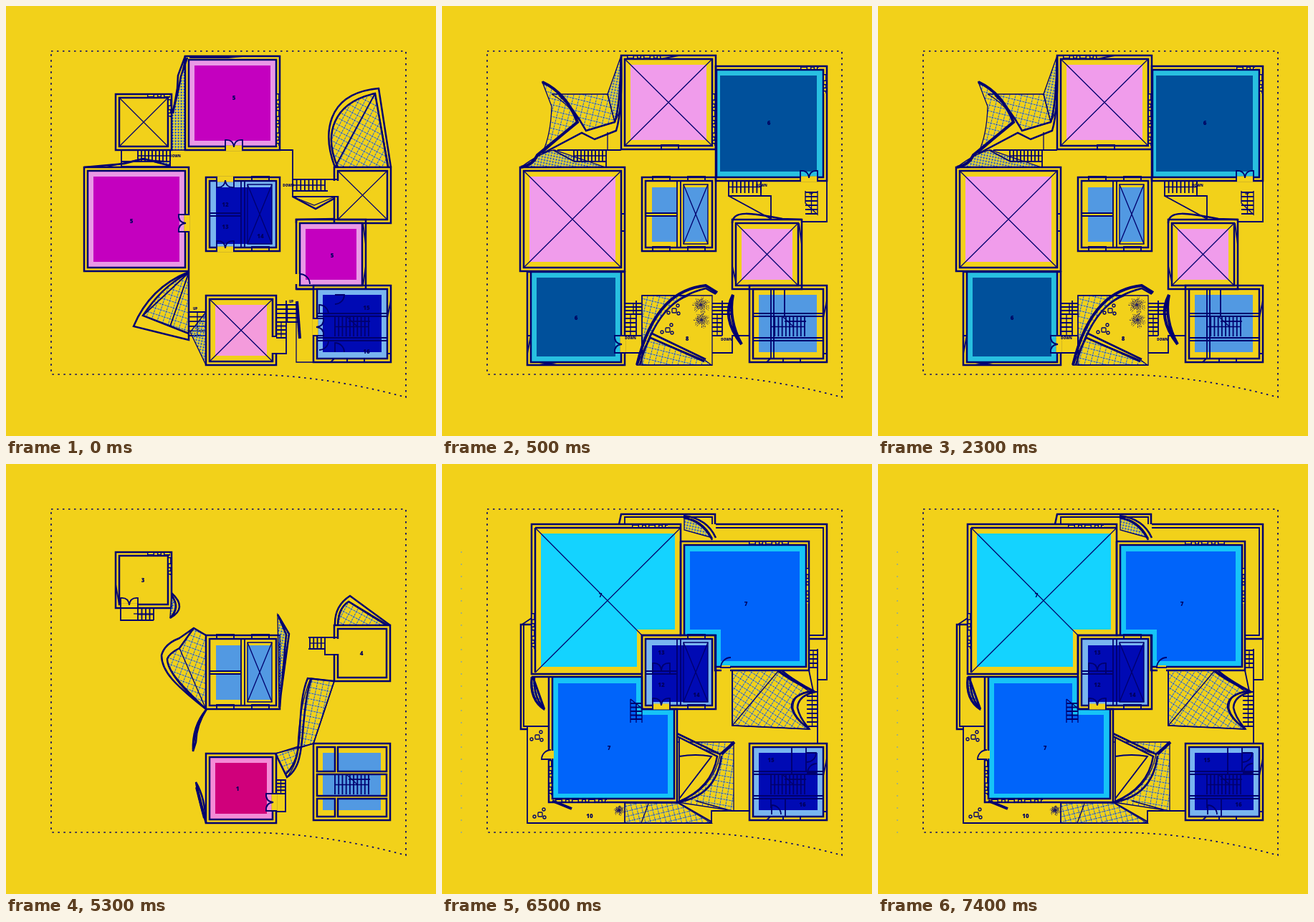
An HTML page that plays this animation: 600x600 px, repeating every 8 s.

```html
<!DOCTYPE html>
<html lang="en">
<head>
<meta charset="utf-8">
<title>Floor plans</title>
<style>
html, body { margin: 0; width: 100%; height: 100%; overflow: hidden; background: #f2d11a; }
svg { display: block; width: 100vw; height: 100vh; }
path, rect { fill: none; stroke: #00006e; stroke-width: 2.5; }
.thin { stroke-width: 1.3; }
.mid { stroke-width: 1.8; }
.fat { stroke-width: 4; }
.flat { stroke: none; }
.frame { stroke-width: 5.5; stroke-dasharray: 10 4 6 3; }
.pane { stroke: #f2d11a; stroke-width: 2.2; stroke-dasharray: 7 7 3 6; stroke-dashoffset: -1.5; }
.net { stroke: #4f97e4; stroke-width: .9; }
.dots { stroke-width: .7; stroke-dasharray: 1.3 3.2; }
.site { stroke-width: 1.7; stroke-dasharray: 2.5 5.5; }
.edge { stroke: #7fa3a8; stroke-width: 1.3; stroke-dasharray: 2 15; }
text { font: 800 8px "Open Sans", Lato, sans-serif; fill: #00005f; text-anchor: middle; }
text.note { font-size: 4.5px; }
.plan { visibility: hidden; animation: 8s step-end infinite; }
#plan0 { animation-name: p0; }
#plan1 { animation-name: p1; }
#plan2 { animation-name: p2; }
#plan3 { animation-name: p3; }
@keyframes p0 { 0% { visibility: visible } 6.25%, 100% { visibility: hidden } }
@keyframes p1 { 0% { visibility: hidden } 6.25% { visibility: visible } 43.75%, 100% { visibility: hidden } }
@keyframes p2 { 0% { visibility: hidden } 43.75% { visibility: visible } 81.25%, 100% { visibility: hidden } }
@keyframes p3 { 0% { visibility: hidden } 81.25%, 100% { visibility: visible } }
</style>
</head>
<body>
<svg id="stage" viewBox="0 0 600 600">
  <path class="site" d="M63 63H558V546Q440 514 330 514H63Z"/>
</svg>
<script>
const YELLOW = '#f2d11a', BLUE = '#5299e2', SKY = '#79b5f0', DEEP = '#000ab4';
const PINK = '#e999e6', MAGENTA = '#c400bf', ROSE = '#f09ceb';
const TEAL = '#28c0e0', OCEAN = '#00509b', CYAN = '#14d3ff', AQUA = '#16c4f7', AZURE = '#0064fa';

const line = (d, cls = '') => `<path class="${cls}" d="${d}"/>`;
const thin = d => line(d, 'thin');
const mid = d => line(d, 'mid');
const fat = d => line(d, 'fat');
const trim = d => line(d, 'frame') + line(d, 'pane');
const area = (d, color) => `<path class="flat" style="fill:${color}" d="${d}"/>`;
const box = (x, y, r, b) => `M${x} ${y}H${r}V${b}H${x}Z`;
const fill = (x, y, r, b, color) => area(box(x, y, r, b), color);
const wall = (x, y, r, b) => line(box(x, y, r, b) + box(x + 5, y + 5, r - 5, b - 5));
const cross = (x, y, r, b) => thin(`M${x} ${y}L${r} ${b}M${r} ${y}L${x} ${b}`);
const label = (s, x, y) => `<text x="${x}" y="${y}">${s}</text>`;
const note = (s, x, y) => `<text class="note" x="${x}" y="${y}">${s}</text>`;

// Outline filled with a wire net turned by `angle`.
let nets = 0;
function mesh(d, angle, size = 8) {
  const id = `net${nets++}`, grid = `M0 .5H${size}M.5 0V${size}`;
  return `<pattern id="${id}" width="${size}" height="${size}" patternUnits="userSpaceOnUse" patternTransform="rotate(${angle})">` +
    line(grid, 'net') + line(grid, 'dots') + '</pattern>' + area(d, `url(#${id})`) + thin(d);
}
const fine = (d, angle = 12) => mesh(d, angle, 4);

// Filled room: light inset, darker core, double wall.
const room = (x, y, r, b, light, dark) =>
  fill(x + 5, y + 5, r - 5, b - 5, light) + fill(x + 13, y + 13, r - 13, b - 13, dark) + wall(x, y, r, b);
const xroom = (x, y, r, b, dark = YELLOW) =>
  room(x, y, r, b, YELLOW, dark) + cross(x + 5, y + 5, r - 5, b - 5);

// Double door in a wall, opening upwards before rotation.
const leaves = 'M-12 2V-12Q-1 -13 0 -2Q1 -13 12 -12V2';
const door = (x, y, turn, gap = YELLOW) => `<g transform="translate(${x} ${y}) rotate(${turn})">` +
  fill(-11, -4.5, 11, 3.5, gap) + mid(leaves) + '</g>';
const leaf = (x, y, turn, size = 13) => `<g transform="translate(${x} ${y}) rotate(${turn})">` +
  mid(`M0 0V${-size}A${size} ${size} 0 0 1 ${size} 0`) + '</g>';

// Treads between two corners; `down` stacks them vertically.
function stairs(x, y, r, b, count, down) {
  let d = '';
  for (let i = 0; i <= count; i++) {
    const k = i / count;
    d += down ? `M${x} ${y + (b - y) * k}H${r}` : `M${x + (r - x) * k} ${y}V${b}`;
  }
  return mid(d) + thin(down ? `M${(x + r) / 2} ${y}V${b}` : `M${x} ${(y + b) / 2}H${r}`);
}

const pane = (x, y) => mid(box(x, y - 2, x + 24, y + 4));

function core(lit) {
  const fills = lit
    ? fill(284, 244, 377, 337, SKY) + fill(293, 253, 371, 332, DEEP)
    : fill(293, 253, 371, 329, BLUE) + fill(327, 245, 336, 336, YELLOW) + fill(285, 288, 328, 293, YELLOW);
  const panes = lit ? [343] : [294, 343];
  return fills + wall(279, 239, 382, 342) +
    mid('M328 244V337M333 244V337M284 289H328M284 293H328') +
    thin(box(337, 249, 371, 332)) + cross(337, 249, 371, 332) +
    panes.map(x => pane(x, 240) + pane(x, 338)).join('');
}

const towerStairs = () => stairs(459, 434, 506, 461, 9) + thin('M475 433L490 447') + mid('M478 440H508');

function tower(lit) {
  const fills = lit
    ? fill(434, 395, 532, 492, SKY) + fill(442, 403, 524, 483, DEEP)
    : fill(442, 403, 523, 483, BLUE);
  return fills + wall(429, 390, 537, 497) +
    mid('M434 429H532M434 433H532M434 463H532M434 467H532') + towerStairs() +
    mid('M453 497L458 492M476 492V497M500 492V497M537 411L532 435M532 485H537');
}

// Scribbled tree made of uneven radial strokes.
function tree(x, y, size) {
  let d = '';
  for (let i = 0; i < 40; i++) {
    const a = i * 2.4, reach = size * (.4 + .6 * Math.sin(i * 5.3) ** 2), from = size * .5 * Math.sin(i * 3.1) ** 2;
    d += `M${(x + Math.cos(a) * from).toFixed(1)} ${(y + Math.sin(a) * from).toFixed(1)}` +
      `L${(x + Math.cos(a + .25) * reach).toFixed(1)} ${(y + Math.sin(a + .25) * reach).toFixed(1)}`;
  }
  return `<path d="${d}" style="stroke-width:.8;stroke-dasharray:2.5 1.2"/>`;
}

const seat = (x, y) => `<rect class="thin" x="${x - 3}" y="${y - 3}" width="6" height="6" rx="1"/>` +
  [[-8, 3], [5, -7], [6, 4]].map(([u, v]) =>
    `<rect class="thin" x="${x + u - 2}" y="${y + v - 2}" width="4" height="4" rx="2"/>`).join('');

const plans = [
  () => fine('M250 72Q243 110 231 150V201H250Z', 0) +
    line('M250 70L240 97L239 115L233 150M253 72L244 98L241 115L233 148') +
    room(250, 70, 382, 201, PINK, MAGENTA) + door(318, 199, 0) + label(5, 318, 131) +
    mid('M256 72H310L330 70') + trim('M379 122V195') +
    xroom(153, 123, 231, 201) + trim('M197 125H229M228 130V155') +
    fine('M139 225L190 213L229 223V217L185 214') +
    mid('M161 201V225M161 201H229V224H161M161 217H229') + stairs(184, 201, 229, 217, 9) + note('DOWN', 236, 211) +
    line('M109 225L165 220L192 213L229 223') +
    room(109, 225, 255, 370, PINK, MAGENTA) + door(253, 303, -90) + label(5, 175, 303) +
    core(true) + door(306, 241, 180) + door(306, 340, 0) +
    label(12, 306, 280) + label(13, 306, 311) + label(14, 355, 324) +
    mesh('M463 225C443 180 455 135 515 122L534 225Z', 28) +
    line('M459 225C442 180 445 122 520 115L537 225M463 225C443 180 455 135 515 122L533 225') + mid('M515 122L459 225') +
    xroom(458, 225, 537, 303) + fill(456, 244, 465, 265, YELLOW) +
    mid('M382 201H400V266H463M400 242H463M400 258H449') + stairs(400, 242, 445, 258, 8) + note('DOWN', 394, 252) +
    line('M400 266L432 283L459 268') + thin('M400 266L430 278L459 266') +
    line('M405 303V298L459 297') +
    room(405, 298, 502, 395, PINK, MAGENTA) + fill(403, 374, 409, 388, YELLOW) + leaf(410, 388, 0, 14) + label(5, 455, 351) +
    mid('M498 303L502 333M498 390L502 363') +
    mesh('M255 372C225 388 208 407 191 432L255 457Z', 18) +
    line('M255 371C220 385 193 411 178 447L255 466V371M255 372C225 388 208 407 191 432L255 457') +
    mid('M255 372L191 432M255 372L229 447') +
    stairs(255, 427, 279, 460, 5, true) + note('UP', 264, 424) +
    fine('M257 455L279 501V427Z') +
    xroom(279, 404, 377, 501, '#f49bdc') + fill(370, 462, 379, 484, YELLOW) +
    mid('M372 461H377M377 485H391V411M377 485H372') + stairs(377, 417, 408, 441, 4, true) +
    stairs(377, 441, 391, 463, 4, true) + note('UP', 398, 414) + fat('M406 412L410 464') +
    thin('M405 413V497H429') + line('M405 395H429') +
    tower(true) + door(431, 448, 90) + leaf(459, 403, 90) + leaf(459, 483, 0) +
    leaf(437, 430, 0) + leaf(437, 467, 90) + label(15, 503, 424) + label(16, 503, 485),

  () => mesh('M140 106Q172 122 189 162L140 205Q152 180 153 140Z', 14) +
    mesh('M153 123H231L241 162L201 174Q180 138 153 123', 14) + fine('M231 123L249 72V145L241 162Z') +
    fine('M110 225Q140 203 157 201L228 225Z') +
    fat('M140 106Q174 122 189 162L133 208Q127 222 110 225') +
    line('M163 124Q184 143 201 174L241 162Q248 144 250 70M140 206L195 177L213 186L243 174Q252 145 250 70') +
    thin('M231 176V201') +
    mid('M161 201H250M155 201L185 217H229V225') + stairs(184, 201, 229, 217, 9) +
    xroom(250, 69, 382, 200, ROSE) + pane(306, 196) + trim('M258 71H306M379 122V195') + mid('M306 74L330 69') +
    fill(382, 90, 532, 239, TEAL) + fill(388, 97, 523, 231, OCEAN) +
    line(box(382, 84, 537, 244) + box(383, 89, 532, 239)) +
    door(512, 242, 0) + label(6, 456, 166) + trim('M500 87H526M534 95V122') +
    xroom(109, 225, 255, 370, ROSE) + mid(box(250, 290, 255, 314)) +
    fill(124, 372, 250, 497, TEAL) + fill(132, 379, 242, 489, OCEAN) +
    line('M119 371H255V501H119ZM124 371V497H250V371') + door(253, 472, -90) + label(6, 187, 438) +
    mid('M119 460H124L119 485M136 497L160 501M136 501L160 497') +
    core(false) +
    mid('M400 244V265H445V244M400 265L459 297V265H445') + stairs(400, 244, 445, 261, 8) + note('DOWN', 446, 252) +
    mid('M537 244V301H502') + stairs(507, 260, 524, 290, 5, true) + thin('M507 258V275L524 291V258') + note('UP', 515, 263) +
    line('M405 303C405 284 432 289 475 297L502 298') + xroom(405, 298, 502, 395, ROSE) +
    mid('M498 303L502 333M405 363L410 385') +
    tower(false) + mid('M459 395V492M463 395V492M478 395V433') +
    mesh('M279 404H345Q312 416 293 457L279 484Z', 14) + mesh('M291 463L368 495L376 501H272Z', 14) +
    thin(box(279, 404, 377, 501)) +
    fat('M272 501C292 418 330 394 368 390L384 400') + line('M276 501C299 418 336 402 368 394L382 402M293 457L368 493M291 463L366 496') +
    tree(361, 417, 13) + tree(362, 438, 12) + seat(324, 425) + seat(315, 452) + label(8, 342, 467) +
    stairs(255, 415, 279, 430, 3, true) + stairs(255, 430, 271, 460, 5, true) + mid('M255 460H279V484H255M271 411V460') + note('DOWN', 263, 465) +
    stairs(377, 415, 405, 430, 3, true) + stairs(377, 430, 391, 460, 5, true) + mid('M377 484H405V460H429M391 411V460') + note('DOWN', 397, 467) +
    fat('M406 403Q389 435 418 472Q399 437 406 403Z'),

  () => wall(153, 123, 231, 201) + door(172, 199, 0) + label(3, 191, 165) +
    trim('M197 125H229M228 130V155') + mid('M153 168L158 196') +
    mid('M160 201V218H206M160 201H206') + stairs(184, 202, 206, 218, 4) + thin('M178 209H206') +
    fine('M231 182Q243 198 229 214Z') + line('M231 180Q254 201 229 215Q244 200 231 184') +
    mesh('M463 225Q462 200 479 192L534 225Z', 28) + line('M459 225Q458 198 480 184L536 225M463 225Q464 201 478 192L531 225') +
    wall(458, 225, 536, 303) + fill(456, 244, 465, 265, YELLOW) + label(4, 496, 267) +
    mid('M422 242H463M422 258H445V266H463') + stairs(424, 242, 445, 258, 4) +
    mesh('M279 342C242 312 225 287 225 272Q226 265 242 257L262 229L279 239Z', 20) +
    line('M279 342C237 309 217 290 217 267Q221 251 242 243L262 229L279 239M279 342C244 309 225 288 225 272Q228 264 242 257L262 229') +
    thin('M242 257L279 342') +
    core(false) +
    fine('M379 210L395 237L381 340Z') + line('M379 210L395 237L381 340M381 214L391 238L382 339') +
    line('M280 342Q259 366 261 401L265 388Q266 363 280 342Z') + line('M278 344Q263 371 261 398') +
    mesh('M425 299L458 303L429 390L407 397Q409 338 425 299Z', 12) + mesh('M376 404L408 394Q407 418 392 437Z', -20) +
    line('M458 303L421 299C408 330 412 375 407 400Q404 420 390 433M426 300C414 335 416 380 410 406Q406 428 392 437L376 404') +
    mid('M376 404L429 390L458 303') +
    room(279, 404, 377, 501, '#f48bd6', '#d0007b') + door(375, 472, -90) + label(1, 323, 456) +
    mid('M377 485H390V440M377 460H390') + stairs(377, 441, 390, 460, 4, true) +
    line('M265 444Q278 466 279 501Q269 469 265 444Z') + fat('M266 451L277 494') +
    fill(442, 403, 523, 483, BLUE) +
    fill(434, 428, 532, 434, YELLOW) + fill(434, 462, 532, 468, YELLOW) +
    fill(458, 395, 464, 430, YELLOW) + fill(458, 467, 464, 492, YELLOW) +
    line(box(429, 390, 536, 497) + box(434, 395, 459, 429) + box(463, 395, 531, 429) +
      box(434, 433, 531, 463) + box(434, 467, 459, 492) + box(463, 467, 531, 492)) + towerStairs(),

  () => line('M27 122V515', 'edge') +
    line('M247 84L250 70H381V84M382 84H537V244H512') + mid('M255 84V74H377V84M382 89H532V239H512M537 244V301H524') +
    line('M125 224H110V370H120') + mid('M110 225L125 215M114 225V366H149') +
    mid('M119 366V501H376V484H429M119 366H149') +
    fine('M338 75Q363 77 377 103L338 92Z') + line('M337 72Q370 76 382 103M337 75Q364 80 377 106') +
    area('M138 97H325V231H272V283H138Z', CYAN) +
    line('M125 84H333V239H279V293H125ZM130 89H333M130 89V291') + thin('M130 89L279 239M130 291L333 89') + label(7, 221, 186) +
    trim('M265 87H315M127 208V258') +
    area('M338 113H508V283H381V239H338Z', AQUA) + area('M346 122H499V275H389V231H346Z', AZURE) +
    line('M333 108H512V288H381V239H338V113H508V283H381M338 239H333V108') + label(7, 424, 198) +
    trim('M428 110H487M510 145V195') + fill(390, 281, 402, 290, YELLOW) + leaf(403, 284, -90, 14) +
    area('M154 298H279V342H324V467H154Z', AQUA) + area('M162 306H271V350H315V460H162Z', AZURE) +
    line('M125 297H279V342H328V472H149V297M154 297V467H324V342') + label(7, 233, 399) +
    stairs(263, 334, 279, 356, 4, true) + thin('M263 328L279 341M271 333V361M279 341V361M263 328V361') +
    trim('M151 413V462M158 470H230') + fill(147, 400, 156, 411, YELLOW) + leaf(152, 412, -90, 13) +
    fat('M154 470L181 481') +
    fine('M126 299Q124 327 142 342L126 297Z') + line('M125 297Q121 329 143 343M129 297Q127 325 143 342L127 297') +
    core(true) + door(306, 290, 0, 'none') + door(306, 339, 0) +
    label(13, 306, 266) + label(12, 306, 311) + label(14, 355, 325) +
    mesh('M405 288H470L512 317Q488 322 490 342Q494 356 513 370L405 365Z', 33) + mid('M405 288V365L513 370') +
    thin('M405 365L470 288') +
    line('M468 288Q485 302 518 317Q487 321 488 340Q492 356 513 370M474 288Q490 302 521 318Q497 323 496 340Q499 355 513 370') +
    mid('M512 288L518 317M524 258V390') + stairs(512, 260, 524, 284, 4, true) + stairs(509, 318, 524, 366, 8, true) +
    mesh('M329 388H407V484L329 472Q379 454 388 405Z', 10) +
    area('M331 382L384 408Q377 452 331 468Z', YELLOW) +
    line('M328 376L388 405L407 388M328 380L384 408Q377 452 329 472M390 407Q383 463 329 472') + fat('M390 405L408 388') +
    mid('M331 381V470M331 408Q354 404 376 408L331 467M329 472L376 499M354 470L404 484') +
    mesh('M255 473H329L376 501H255Z', -14, 7) + thin('M288 474L278 501M255 472V501') +
    seat(133, 381) + seat(137, 489) + tree(247, 483, 8) + label(10, 206, 494) +
    tower(true) + leaf(460, 489, 0) + leaf(523, 431, -90) + leaf(509, 403, 90) +
    mid('M488 395V433M508 395V429M459 467V480M479 467V492') + label(15, 459, 416) + label(16, 503, 478)
];

document.getElementById('stage').insertAdjacentHTML('beforeend',
  plans.map((draw, i) => `<g class="plan" id="plan${i}">${draw()}</g>`).join(''));
</script>
</body>
</html>
```
